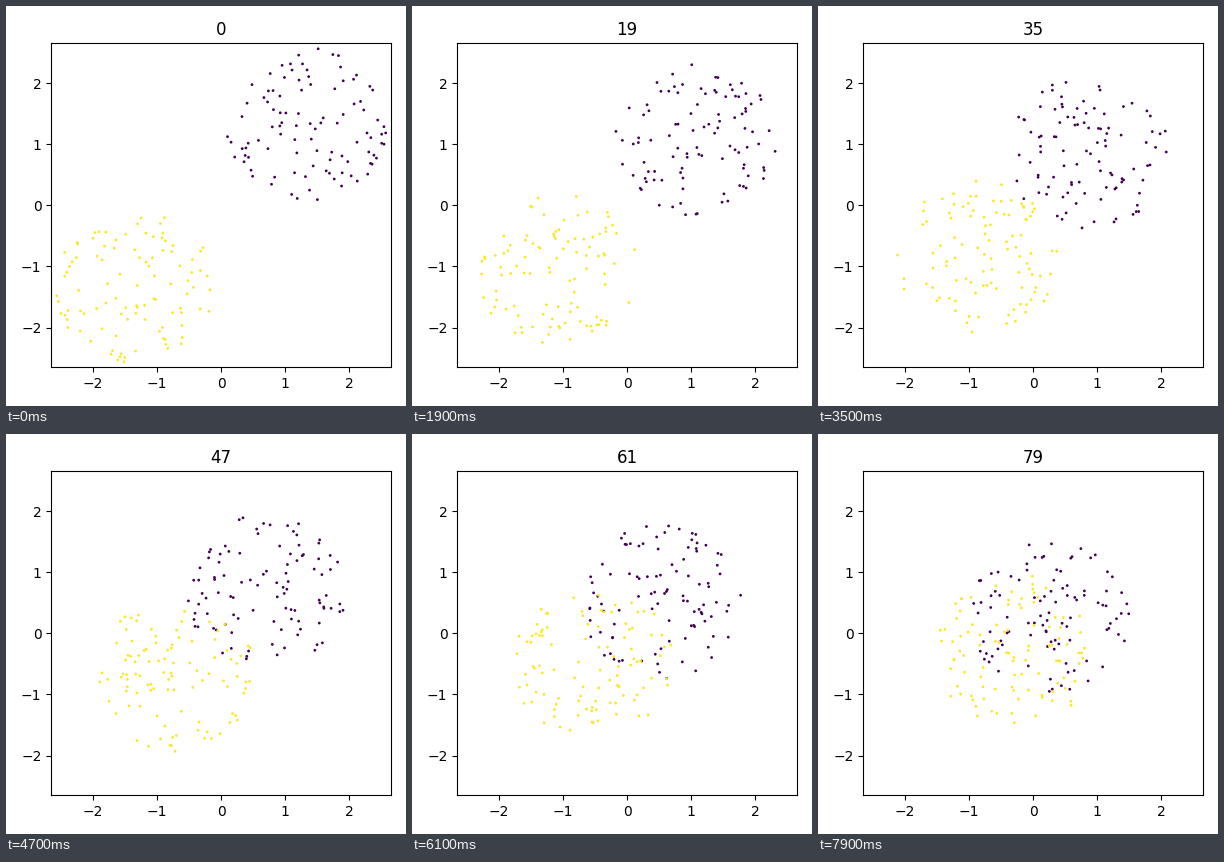
Write a matplotlib script that moves like this. It is 400x400 px and loops after 8000 ms.

```python
import numpy as np
import matplotlib.pyplot as plt
from matplotlib.animation import FuncAnimation

FRAMES = 80
POINTS = 100          # per cluster
RADIUS = 1.262
START, STEP = 1.325, 0.0132
LIMIT = 2.65

fig, ax = plt.subplots(figsize=(4, 4), dpi=100)
labels = np.repeat([0, 1], POINTS)
dots = ax.scatter(np.zeros(2 * POINTS), np.zeros(2 * POINTS),
                  c=labels, cmap="viridis", s=1)
ax.set_xlim(-LIMIT, LIMIT)
ax.set_ylim(-LIMIT, LIMIT)
title = ax.set_title("0")
fig.tight_layout()


def disc(rng, center):
    """Uniform random points in a disc centred on the diagonal."""
    r = RADIUS * np.sqrt(rng.random(POINTS))
    a = 2 * np.pi * rng.random(POINTS)
    return np.column_stack([center + r * np.cos(a), center + r * np.sin(a)])


def update(i):
    # fresh samples each step while the two discs slide together
    rng = np.random.default_rng(i)
    center = START - STEP * i
    dots.set_offsets(np.vstack([disc(rng, center), disc(rng, -center)]))
    title.set_text(str(i))
    return dots, title


anim = FuncAnimation(fig, update, frames=FRAMES, interval=100,
                     repeat=True, repeat_delay=0)
plt.show()
```
